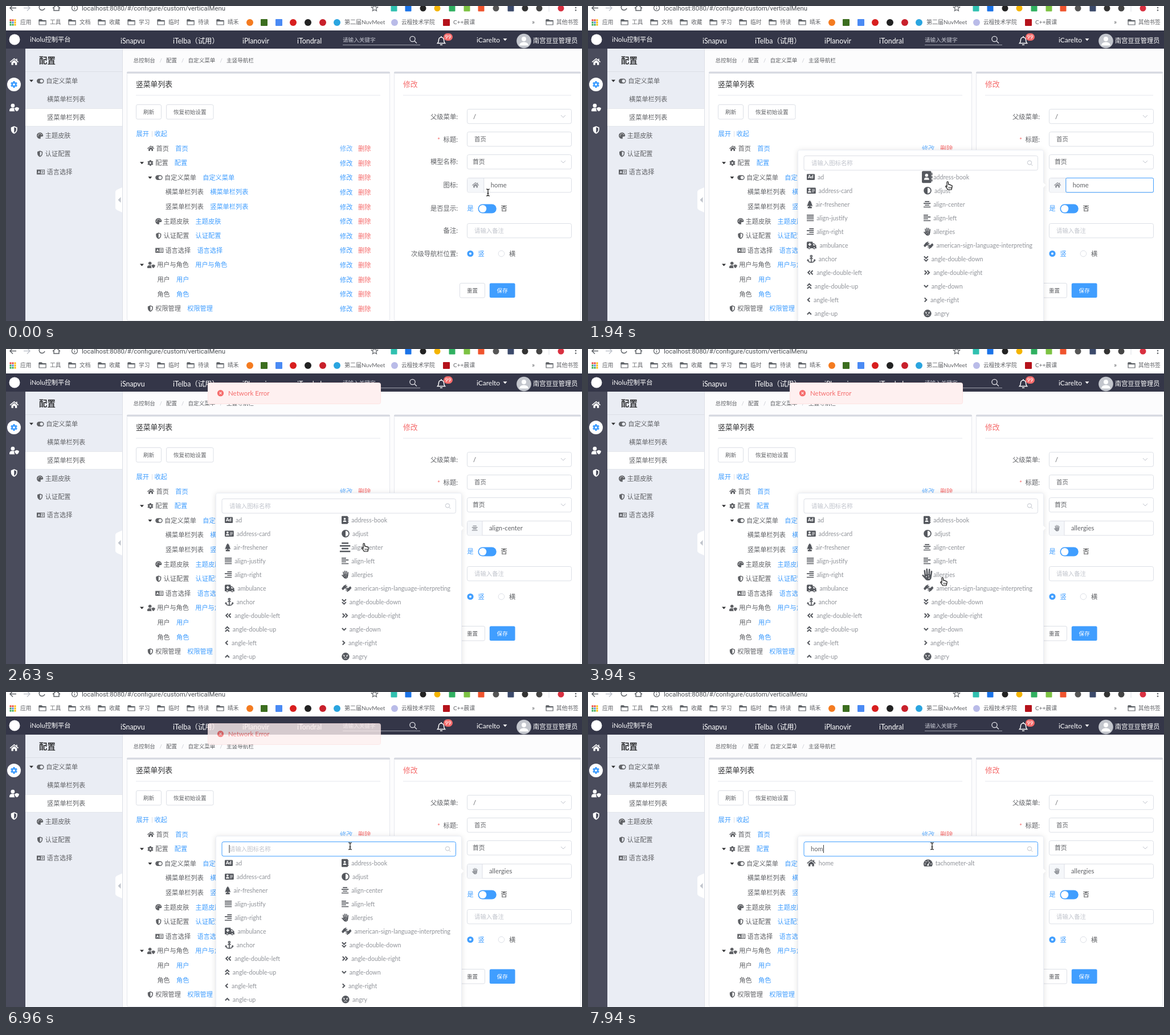
An HTML page for the animation above (8 s loop, 1011 by 554 pixels).

```html
<!DOCTYPE html>
<html lang="zh">
<head>
<meta charset="utf-8">
<title>Icon picker</title>
<style>
  html, body { margin: 0; width: 100%; height: 100%; overflow: hidden; background: #fff; }
  svg { display: block; width: 100vw; height: 100vh; font-family: Lato, "Noto Sans CJK SC", "Noto Sans CJK", sans-serif; }
  text { white-space: pre; }
  .glyph { transform-box: fill-box; transform-origin: center; }
  .glyph.big { transform: scale(1.5); }
  #popover { filter: drop-shadow(0 1px 5px rgba(0, 0, 0, .12)); }
</style>
</head>
<body>
<script>
const BLUE = '#409eff', RED = '#f56c6c', INK = '#606266', LINE = '#dcdfe6', PALE = '#c0c4cc', DARK = '#303133', CHROME = '#5f6368';
const LOOP = 8000;

// Drawing helpers; y of text and icons is their vertical centre
const text = (x, y, s, size = 11.2, fill = INK, extra = '') =>
  `<text x="${x}" y="${y + size * .37}" font-size="${size}" fill="${fill}" ${extra}>${s}</text>`;
const rect = (x, y, w, h, fill, stroke = 'none', rx = 0, extra = '') =>
  `<rect x="${x}" y="${y}" width="${w}" height="${h}" rx="${rx}" fill="${fill}" stroke="${stroke}" ${extra}/>`;
const disc = (x, y, r, fill = 'currentColor', stroke = 'none', sw = 1) =>
  `<circle cx="${x}" cy="${y}" r="${r}" fill="${fill}" stroke="${stroke}" stroke-width="${sw}"/>`;
const fill = (d, c = 'currentColor') => `<path d="${d}" fill="${c}"/>`;
const line = (d, w = 2, c = 'currentColor', extra = '') =>
  `<path d="${d}" fill="none" stroke="${c}" stroke-width="${w}" ${extra}/>`;
const caretDown = (x, y, c) => fill(`M${x - 3.5} ${y - 1.8}h7l-3.5 4z`, c);

const bars = x => line(`M${x} 2.5h9M0 6.2h14M${x} 9.8h9M0 13.5h14`, 1.9);
const person = (x, y) => disc(x, y, 2.1, '#fff') + fill(`M${x - 3.4} ${y + 6}c0-2 1-3 2.2-3h2.4c1.2 0 2.2 1 2.2 3z`, '#fff');

// name: [width in sixteenths of an em, markup on a grid 16 high]
const ICONS = {
  home: [18, line('M.8 8.7 9 2l8.2 6.7', 1.8) + fill('M3.4 9.2 9 4.7l5.6 4.5v5.3h-3.8v-4H7.2v4H3.4zM13 2h2v4.4l-2-1.7z')],
  cog: [16, disc(8, 8, 4, 'none', 'currentColor', 3.4) + line('M8 .6v3M8 12.4v3M1.6 4.3l2.6 1.5M11.8 10.2l2.6 1.5M14.4 4.3l-2.6 1.5M4.2 10.2l-2.6 1.5', 3.4)],
  toggle: [18, fill('M6 2h6a6 6 0 0 1 0 12H6A6 6 0 0 1 6 2zM12 4a4 4 0 0 0 0 8 4 4 0 0 0 0-8z')],
  palette: [16, fill('M8 0a8 8 0 1 0 0 16c2 0 2-1.5 1.6-2.6C9 12 10 10 11.6 10H14c1.2 0 2-.8 2-2 0-4.5-3.6-8-8-8z')
    + [[3.5, 8], [5, 4.5], [8.5, 3], [12, 5.2]].map(p => disc(...p, 1.1, '#fff')).join('')],
  shield: [16, fill('M8 0l6.5 2.7V7c0 4-2.5 7.5-6.5 9-4-1.5-6.5-5-6.5-9V2.7zM8 2.2v11.5c2.7-1.3 4.4-3.8 4.4-6.7V4z')],
  language: [20, fill('M0 2h20v12H0zM10.5 3.5v9h8v-9zM5 4.8 2.4 11.2h1.5l.5-1.4h2.2l.5 1.4h1.5L6 4.8z')
    + line('M11.5 6h6M14.5 4.7V6M16.6 6c-.5 2.5-2 4.2-4.3 5.2M12.8 7.3c.5 1.7 2 3.3 4.2 3.9', 1.1)],
  'user-shield': [20, disc(7, 4, 4) + fill('M0 14.5C0 11 2 9 5 9h4l1 .3V12c0 1.5.5 3 1.5 4H1.3C.5 16 0 15.5 0 14.5zM15.5 7 20 8.8c0 3.5-1.5 6-4.5 7.2-3-1.2-4.5-3.7-4.5-7.2z')],
  ad: [16, rect(0, 2, 16, 12, 'currentColor', 'none', 1.5) + text(2.4, 8, 'Ad', 8.5, '#fff', 'font-weight="900"')],
  'address-book': [14, rect(0, 0, 12.6, 16, 'currentColor', 'none', 1.5) + line('M13.4 2.5v3M13.4 6.7v3M13.4 11v3', 1.3) + person(6.3, 5.8)],
  'address-card': [18, rect(0, 2, 18, 12, 'currentColor', 'none', 1.5) + person(5.5, 5.8) + line('M10.5 6h5.5M10.5 8.3h5.5M10.5 10.6h3.5', 1, '#fff')],
  adjust: [16, disc(8, 8, 6.8, 'none', 'currentColor', 2) + fill('M8 1.5a6.5 6.5 0 0 0 0 13z')],
  'air-freshener': [12, fill('M6 0l3.7 5H8.5L11 8.3H9.8L12 11.5H7.2v1.3H10V16H2v-3.2h2.8v-1.3H0l2.2-3.2H1L3.5 5H2.3z')],
  'align-center': [14, bars(2.5)],
  'align-justify': [14, line('M0 2.5h14M0 6.2h14M0 9.8h14M0 13.5h14', 1.9)],
  'align-left': [14, bars(0)],
  'align-right': [14, bars(5)],
  allergies: [14, line('M4.4 9 3.6 3M7 8.5 6.6 1.1M9.6 8.5l.4-7M12 10l.9-6', 2, 'currentColor', 'stroke-linecap="round"')
    + fill('M3.4 8h9.7l-.3 4c-.3 2.5-1.8 4-4 4H7.300c-1.300 0-2.100-.6-2.800-1.600L.4 9.800c-.6-1.200.9-2.200 1.800-1.100l1.300 1.500z')
    + disc(6, 11, .7, '#fff') + disc(9, 10, .7, '#fff') + disc(9.5, 13, .7, '#fff')],
  ambulance: [20, fill('M1.5 1h9A1.5 1.5 0 0 1 12 2.5V4h2.5L19 8.5V13H20v1H0V2.5zM13 5.5v3h4l-3-3z')
    + line('M6 3.5v6M3 6.5h6', 2, '#fff') + disc(5, 13.3, 2, '#fff', 'currentColor', 1.6) + disc(15, 13.3, 2, '#fff', 'currentColor', 1.6)],
  'american-sign-language-interpreting': [20, fill('M0 8.5 4.5 3 9 .5l1 1.6-2.5 2 4-.6.3 1.700-3.300 1.100L10.500 8.500 9 9.500 7 8 5.500 9.500 2.500 12zM20 7.500 15.500 13 11 15.500l-1-1.600 2.500-2-4 .6-.3-1.700 3.300-1.100L9.500 7.500 11 6.500 13 8l1.500-1.500 3-2.500z')],
  anchor: [18, disc(9, 2.7, 1.8, 'none', 'currentColor', 1.8) + line('M9 4.5V15M5.7 7.2h6.6M2 10.5c.7 3 3.5 4.5 7 4.5s6.3-1.5 7-4.5', 1.9) + fill('M0 12l2-4 3 3.4zM18 12l-2-4-3 3.4z')],
  'angle-double-down': [10, line('M1 3l4 4 4-4M1 8.5l4 4 4-4', 2.3)],
  'angle-double-left': [14, line('M6.5 4l-4 4 4 4M12 4 8 8l4 4', 2.3)],
  'angle-double-right': [14, line('M2 4l4 4-4 4M7.5 4l4 4-4 4', 2.3)],
  'angle-double-up': [10, line('M1 7.5l4-4 4 4M1 13l4-4 4 4', 2.3)],
  'angle-down': [10, line('M1 6l4 4 4-4', 2.3)],
  'angle-left': [8, line('M6 4 2 8l4 4', 2.3)],
  'angle-right': [8, line('M2 4l4 4-4 4', 2.3)],
  'angle-up': [10, line('M1 10l4-4 4 4', 2.3)],
  angry: [16, disc(8, 8, 7.7) + disc(5.2, 7.5, 1.1, '#fff') + disc(10.8, 7.5, 1.1, '#fff') + line('M3 5l3.3 1.3M13 5 9.7 6.3M5 12.3c1.5-2 4.5-2 6 0', 1.1, '#fff')],
  'tachometer-alt': [18, fill('M9 1a9 9 0 0 0-7.8 13.5l1 .5h13.6l1-.5A9 9 0 0 0 9 1z')
    + [[3, 10], [5, 5.5], [9, 3.8], [15, 10]].map(p => disc(...p, 1, '#fff')).join('') + line('M9 12l3-6', 1.2, '#fff') + disc(9, 12, 1.7, '#fff')],
  plain: [16, rect(1, 1, 14, 14, 'currentColor', 'none', 2) + line('M8 4v8M4 8h8', 2.4, '#fff')],
};
const iconOf = name => ICONS[name] || ICONS.plain;
const icon = (name, x, y, em, color) =>
  `<g transform="translate(${x} ${y - em / 2}) scale(${em / 16})" color="${color}" fill-rule="evenodd">${iconOf(name)[1]}</g>`;

const NAMES = ('ad address-book address-card adjust air-freshener align-center align-justify align-left align-right allergies '
  + 'ambulance american-sign-language-interpreting anchor angle-double-down angle-double-left angle-double-right angle-double-up '
  + 'angle-down angle-left angle-right angle-up angry ankh archive archway arrow-alt-circle-right arrow-circle-right arrow-right '
  + 'arrows-alt-h bath chalkboard chart-area chart-bar chart-line chart-pie check check-circle check-square chess child church '
  + 'headphones headphones-alt hockey-puck home horse hospital hospital-alt hospital-symbol hot-tub hotel hourglass hourglass-end '
  + 'hourglass-half phone phone-slash phone-square phone-volume shopping-bag shopping-basket shopping-cart tachometer-alt').split(' ');

function browser() {
  const folder = x => line(`M${x + .6} 25v8h12v-7.500h-6l-1.500-1.500h-4z`, 1.2, CHROME) + fill(`M${x} 24.500q0-1 1-1h3.500l1.500 1.500h6.200v2.200H${x}z`, CHROME);
  const apps = ['#ea4335', '#ea4335', '#fbbc05', '#34a853', '#4285f4', '#fbbc05', '#34a853', '#34a853', '#fbbc05'];
  const marks = [[428, '#f47b20'], [453, '#3c6e1f', 1], [479, '#4a8af4', 1], [504, '#d81e1e'], [530, '#222'], [556, '#c8202b'], [581, '#2aa5e0'], [682, '#b9bbe8'], [773, '#b5121b', 1]];
  const tools = [[681, '#2fc0b0', 1], [706, '#1a73e8', 1], [732, '#222'], [757, '#f4b400'], [783, '#30b060', 1], [809, '#7cc242', 1], [834, '#f0542d', 1], [860, '#555'], [886, '#3b4a6b', 1], [911, '#333'], [936, '#444'], [974, '#d93040']];
  const logo = (y, r) => ([x, c, square]) => square ? rect(x - r, y - r, 2 * r, 2 * r, c, 'none', 1) : disc(x, y, r, c);
  return rect(0, 0, 1011, 43, '#fff')
    + line('M18 3.5H7M12-1.5 7 3.5l5 5', 1.5, CHROME) + line('M31 3.5h11M37-1.5l5 5-5 5', 1.5, PALE)
    + line('M67-1a5 5 0 1 0 1 5M84 3v5h9V3M82 4l6.5-6 6.5 6', 1.5, CHROME)
    + disc(120.5, 3.5, 5, 'none', CHROME, 1.2) + line('M120.5 3v3.5M120.5 .5v1.2', 1.2, CHROME)
    + text(133, 4, 'localhost:8080/#/configure/custom/verticalMenu', 11.4, '#4b4f54', 'font-family="Roboto, sans-serif"')
    + line('M647-2l1.6 3.6 4 .4-3 2.6.9 4-3.5-2-3.5 2 .9-4-3-2.6 4-.4z', 1.2, CHROME)
    + tools.map(logo(4, 5.5)).join('') + line('M953 0v10', 1, LINE) + disc(1000, 3, 1.3, CHROME) + disc(1000, 7.5, 1.3, CHROME)
    + apps.map((c, i) => rect(6.5 + i % 3 * 4, 23.5 + (i / 3 | 0) * 4, 3, 3, c)).join('')
    + text(25, 28.5, '应用', 9.7)
    + ['工具', '文档', '收藏', '学习', '临时', '待读', '晴禾'].map((s, i) => folder(57.5 + 52 * i) + text(77 + 52 * i, 28.5, s, 9.7)).join('')
    + marks.map(logo(29, 6)).join('')
    + text(594, 28.5, '第二届NuvMeet', 10) + text(694, 28.5, '云檀技术学院', 9.8) + text(785, 28.5, 'C++晨课', 10)
    + text(923, 28, '»', 12) + folder(947.5) + text(966, 28.5, '其他书签', 9.7);
}

function header() {
  const nav = [[201, 'iSnapvu'], [293, 'iTelba（试用）'], [415, 'iPlanovir'], [511, 'iTondral']];
  return rect(0, 43, 1011, 32, '#343648') + disc(15, 59, 9.5, '#fff')
    + text(42, 59, 'iNolu控制平台', 11.3, '#fff')
    + nav.map(([x, s]) => text(x, 61.5, s, 12.4, '#fff')).join('')
    + text(591, 59, '请输入关键字', 9.6, '#c3c5cf') + line('M591 68.5h136', 1, '#a0a2ae')
    + disc(713.5, 58, 4.6, 'none', '#e4e5ea', 1.3) + line('M717 61.5l4 4', 1.3, '#e4e5ea')
    + line('M757.5 65.5h13c-2-2-2-4-2-6a4.5 4.5 0 0 0-9 0c0 2 0 4-2 6zM764 53v2M762 68.3h4', 1.5, '#fff')
    + rect(768, 48, 16, 13, RED, 'none', 6.5) + text(776, 54.5, '99', 9.4, '#fff', 'text-anchor="middle"')
    + text(826, 59.5, 'iCarelto', 12, '#fff') + caretDown(876, 59, '#fff')
    + disc(909, 61.5, 12.8, '#c3c6cd') + disc(909, 58, 4, '#fff') + fill('M901 69.5c0-8 16-8 16 0z', '#fff')
    + text(925, 61, '南宫豆豆管理员', 11.2, '#fff');
}

function sidebars() {
  const entry = (y, name, label) => icon(name, 54, y, 11.2, INK) + text(54 + iconOf(name)[0] * .7 + 3.6, y, label);
  return rect(0, 75, 34, 479, '#4a4c5c') + icon('home', 6.5, 98, 14, '#fff')
    + disc(14, 138, 12, '#fff') + icon('cog', 7.5, 138, 13, BLUE)
    + icon('user-shield', 6, 178.5, 13.5, '#fff') + icon('shield', 7.5, 218, 13.5, '#fff')
    + rect(34, 75, 170, 479, '#eaedf4') + line('M34 115.5h170', 1, LINE) + rect(34, 180, 170, 31.5, '#fff') + line('M34 180.5h170M34 211.5h170', .7, LINE)
    + line('M204.5 75v479', 1, LINE)
    + text(58, 96, '配置', 14.4, DARK, 'font-weight="700"')
    + caretDown(44.5, 131.5, DARK) + entry(132, 'toggle', '自定义菜单')
    + text(72, 164, '横菜单栏列表') + text(72, 196, '竖菜单栏列表')
    + entry(228, 'palette', '主题皮肤') + entry(260, 'shield', '认证配置') + entry(292, 'language', '语言选择')
    + fill('M204 319l-9 4q-3 1.5-3 4v28q0 2.5 3 4l9 4z', '#fff') + fill('M201.5 336v10l-5-5z', PALE);
}

const button = (x, y, w, label, primary) =>
  (primary ? rect(x, y, w, 25.6, BLUE, 'none', 2.5) : rect(x, y, w, 25.5, '#fff', LINE, 2.5))
  + text(x + w / 2, y + 12.8, label, 9.6, primary ? '#fff' : INK, 'text-anchor="middle"');
const card = (x, w, title, color) => rect(x + .5, 116.5, w, 437, '#fff', '#e6e8ee', 3) + rect(x, 115.5, w + 1, 3.2, '#d5d8e0', 'none', 1.5)
  + text(x + 16, 137.6, title, 12.8, color) + line(`M${x + 16} 157h${w - 32}`, 1, '#e4e7ed');

function tree() {
  const rows = [[0, 'home', '首页'], [0, 'cog', '配置', 1], [1, 'toggle', '自定义菜单', 1], [2, '', '横菜单栏列表'], [2, '', '竖菜单栏列表'],
    [1, 'palette', '主题皮肤'], [1, 'shield', '认证配置'], [1, 'language', '语言选择'], [0, 'user-shield', '用户与角色', 1],
    [1, '', '用户'], [1, '', '角色'], [0, 'shield', '权限管理']];
  return rows.map(([depth, name, label, open], i) => {
    const y = 250.5 + 25.6 * i, x = 247.8 + 14.4 * depth;
    const tx = x + (name ? iconOf(name)[0] * .7 : 0) + 3.2;
    return (open ? caretDown(x - 9.3, y, DARK) : '') + (name ? icon(name, x, y, 11.2, INK) : '')
      + text(tx, y, label) + text(tx + 11.2 * (label.length + 1), y, label, 11.2, BLUE)
      + text(586, y + .5, '修改', 11.2, i ? BLUE : '#66b1ff') + text(618, y + .5, '删除', 11.2, RED);
  }).join('');
}

function crumbs() {
  const parts = [[223.5, '总控制台'], [281, '配置'], [319.5, '自定义菜单'], [387, '主竖导航栏']];
  return parts.map(([x, s], i) => (i ? text(x - 11.5, 95, '/', 9.6, PALE) : '') + text(x, 95, s, 9.6)).join('');
}

function form() {
  const labels = [[194.5, '父级菜单'], [234.5, '标题'], [274, '模型名称'], [314.5, '图标'], [355.5, '是否显示'], [395, '备注'], [435.5, '次级导航栏位置']];
  return labels.map(([y, s]) => text(793, y, s + ':', 11.3, INK, 'text-anchor="end"')).join('')
    + text(757, 236, '*', 12, RED)
    + [181.5, 221.5, 261.5, 302.5, 382.5].map(y => rect(809.5, y, 183, 25.3, '#fff', LINE, 3)).join('')
    + [194, 274].map(y => line(`M974 ${y - 2}l4 4 4-4`, 1, PALE)).join('')
    + text(820, 194.5, '/', 11.2) + text(822, 234.5, '首页', 10.4) + text(819, 274, '首页', 10.8) + text(822, 395, '请输入备注', 10.4, PALE)
    + '<g id="field"></g>'
    + text(809.5, 356, '是', 11.2, BLUE) + rect(828.5, 348.5, 32.3, 16, BLUE, 'none', 8) + disc(836.7, 356.5, 6.6, '#fff') + text(868.5, 356, '否', 11.2, DARK)
    + disc(815, 435.5, 5.6, BLUE) + disc(815, 435.5, 2, '#fff') + text(828.5, 435.5, '竖', 11.2, BLUE)
    + disc(869.5, 435.5, 5.3, '#fff', LINE) + text(883, 435.5, '横')
    + button(796.5, 487.5, 44, '重置') + button(848.8, 487.5, 44.8, '保存', true);
}

const fieldMarkup = (name, focused) => {
  const em = 11.2, w = iconOf(name)[0] / 16 * em, edge = 809.5 + w + 16.7;
  return fill(`M${edge} 303H812.5q-2.5 0-2.5 2.5v19.5q0 2.5 2.5 2.5H${edge}z`, '#f5f7fa') + line(`M${edge} 302.5v25.3`, 1, LINE)
    + icon(name, 817.8, 315, em, '#909399') + text(edge + 12, 315, name, 11.3)
    + (focused ? rect(edge, 302.5, 992.5 - edge, 25.3, 'none', BLUE, 2) : '');
};

const listMarkup = query => NAMES.filter(n => n.includes(query)).slice(0, 22).map((n, i) => {
  const x = i % 2 ? 589 : 384, y = 300.7 + 24 * (i >> 1);
  return `<g class="glyph" data-name="${n}">${icon(n, x, y, 14, '#55585e')}</g>` + text(x + iconOf(n)[0] * .875 + 5, y, n, 10.6, '#909399');
}).join('');

const popover = () => `<g id="popover">${rect(368.5, 253.5, 431, 330, '#fff', '#ebeef5', 3)}${fill('M799 310.5l4.5 4.5-4.5 4.5z', '#fff')}`
  + rect(379, 263.5, 410.5, 25.3, '#fff', LINE, 3, 'id="search"')
  + disc(775, 275.5, 3.6, 'none', PALE) + line('M777.6 278.2l2.8 2.8', 1, PALE)
  + text(392, 276, '请输入图标名称', 10.4, PALE, 'id="hint"') + text(391, 276, '', 11, INK, 'id="query"')
  + '<rect id="caret" y="269" width="1" height="14" fill="#303133"/><g id="list"></g></g>';

const message = () => `<g clip-path="url(#page)"><g id="message">${rect(354.5, 59.5, 303, 37, '#fef0f0', '#fde2e2', 3)}`
  + disc(376.5, 77.7, 5.6, RED) + line('M374.5 75.7l4 4M378.5 75.7l-4 4', 1.1, '#fef0f0') + text(390, 77.9, 'Network Error', 11.5, RED) + '</g></g>';

const POINTERS = {
  beam: line('M-3-6q3 0 3 1.5 0-1.5 3-1.5M0-5V5M-3 6q3 0 3-1.5Q0 6 3 6M-1.5 1.5h3', 1.2, '#111'),
  arrow: '<path d="M-4-7V5.5l2.9-2.7L1 7.5l2-.9-2-4.6h4z" fill="#111" stroke="#fff"/>',
  hand: '<path d="M-3.5-7c1.3-.4 2 .3 2 1.3v3.5c1.3-.5 2 0 2.2.7 1.2-.4 2 0 2.2.8 1.5-.3 2.3.4 2.3 1.7 0 3-1 3.7-1.2 6h-6.5c-.6-2-3-3.6-3.8-5.6.2-1.3 1.5-1.2 2.3.1v-7.3q0-.9.5-1.2z" fill="#fff" stroke="#111" stroke-width="1.2"/><path d="M-.8 2v3M1.2 2v3M3.2 2v3" stroke="#111" stroke-width=".8"/>',
};

// Each track is a list of [time, ...values], held until the next step
const TRACKS = {
  pointer: [[0, 'beam', 846, 328], [150, 'beam', 847, 320], [1050, 'arrow', 767, 321], [1260, 'arrow', 750, 324], [1640, 'arrow', 692, 323],
    [1790, 'hand', 634, 316], [2330, 'hand', 632, 342], [2480, 'hand', 631, 349], [2750, 'hand', 630, 358], [2870, 'hand', 628, 372],
    [2990, 'hand', 626, 387], [3100, 'hand', 624, 397], [3820, 'hand', 624, 403], [3940, 'hand', 625, 409], [6130, 'hand', 625, 397],
    [6250, 'hand', 618, 352], [6360, 'hand', 608, 296], [6480, 'beam', 604, 271]],
  field: [[0, 'home', false], [390, 'home', true], [2060, 'address-book', false], [2630, 'align-center', false], [3220, 'allergies', false]],
  popover: [[0, 0], [1260, .6], [1440, 1]],
  message: [[0, 20, 0], [2060, 38, .35], [2180, 51, .8], [2330, 58, .97], [2480, 58, 1], [6960, 54, .8], [7070, 36, .3], [7190, 20, 0]],
  hover: [[0, ''], [1940, 'address-book'], [2480, 'align-center'], [2870, 'align-left'], [2990, 'allergies'],
    [6250, 'align-center'], [6360, 'address-book'], [6480, '']],
  search: [[0, LINE], [6480, PALE], [6960, BLUE]],
  query: [[0, ''], [7580, 'h'], [7700, 'ho'], [7940, 'hom']],
  caret: [[0, 0], [6960, 1], [7430, 0], [7580, 1]],
};

document.body.innerHTML = '<svg viewBox="0 0 1011 554"><defs><clipPath id="page"><rect y="43" width="1011" height="511"/></clipPath></defs>'
  + rect(0, 0, 1011, 554, '#fcfcfd') + browser() + header() + sidebars() + crumbs()
  + card(212, 461, '竖菜单列表', DARK) + button(228.5, 173.5, 44, '刷新') + button(281.5, 173.5, 82.5, '恢复初始设置')
  + text(228.5, 225, '展开', 11.2, BLUE) + line('M256.5 220v10', 1, LINE) + text(260.5, 225, '收起', 11.2, BLUE) + tree()
  + card(681, 327, '修改', RED) + form() + popover() + message() + '<g id="pointer"></g></svg>';

const el = id => document.getElementById(id);
const APPLY = {
  pointer(kind, x, y) { el('pointer').innerHTML = `<g transform="translate(${x} ${y})">${POINTERS[kind]}</g>`; },
  field(name, focused) { el('field').innerHTML = fieldMarkup(name, focused); },
  popover(opacity) { el('popover').style.opacity = opacity; },
  message(top, opacity) {
    el('message').setAttribute('transform', `translate(0 ${top - 58})`);
    el('message').style.opacity = opacity;
  },
  query(s) {
    el('query').textContent = s;
    el('hint').style.opacity = s ? 0 : 1;
    el('list').innerHTML = listMarkup(s);
    el('caret').setAttribute('x', 391.5 + (s ? el('query').getComputedTextLength() : 0));
  },
  hover(name) { document.querySelectorAll('.glyph').forEach(g => g.classList.toggle('big', g.dataset.name === name)); },
  search(color) { el('search').setAttribute('stroke', color); },
  caret(on) { el('caret').style.opacity = on; },
};

const order = ['query', 'hover', 'field', 'popover', 'message', 'search', 'caret', 'pointer'];
const shown = {};
const start = performance.now();
function render() {
  const t = (performance.now() - start) % LOOP;
  for (const key of order) {
    const step = TRACKS[key].findLast(s => s[0] <= t);
    if (shown[key] === step) continue;
    shown[key] = step;
    APPLY[key](...step.slice(1));
  }
  requestAnimationFrame(render);
}
render();
</script>
</body>
</html>
```
